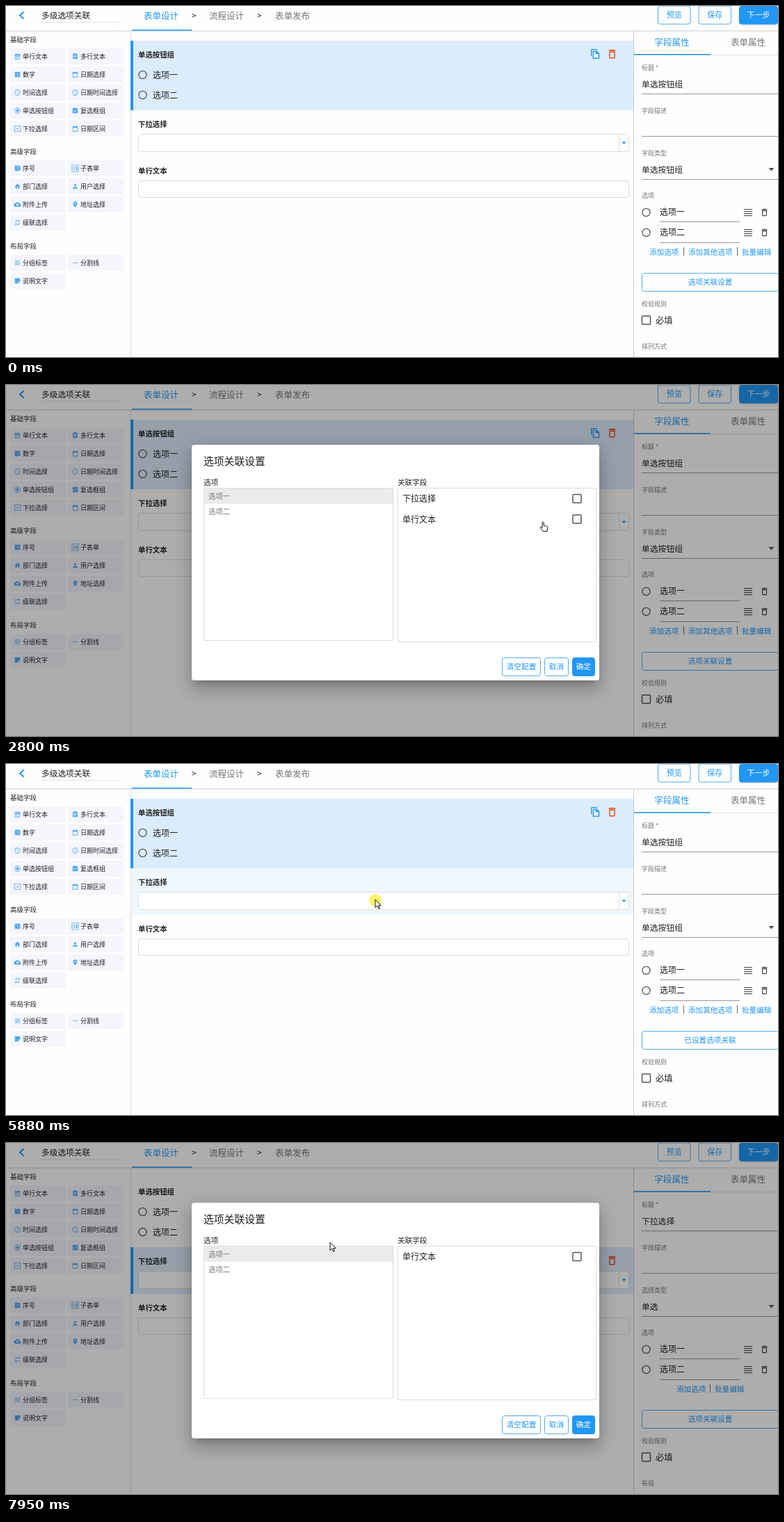
Write an HTML page with a canvas that moves like this. It is 1110 px wide and 505 px high and loops after 8 s.

```html
<!DOCTYPE html>
<html lang="zh">
<head>
<meta charset="utf-8">
<title>多级选项关联</title>
<style>
html, body { margin: 0; width: 100%; height: 100%; overflow: hidden; background: #fff; }
canvas { display: block; }
</style>
</head>
<body>
<canvas id="stage" width="1110" height="505"></canvas>
<script>
const W = 1110, H = 505, LOOP = 8000;
const BLUE = '#2196f3', EDGE = '#4fabf5', INK = '#212121', GREY = '#757575', LINE = '#dcdcdc';
const FONT = '"Noto Sans CJK SC", "Noto Sans CJK", "Noto Sans", sans-serif';
const screen = document.getElementById('stage').getContext('2d');
const layer = document.createElement('canvas');
layer.width = W;
layer.height = H;
const layerCtx = layer.getContext('2d');
let g = screen;

// Icons on a 24 unit grid, filled even-odd
const CAL = 'M3 4h3V2h2v2h8V2h2v2h3v18H3zM5 9v11h14V9z';
const icons = {
  cal: CAL,
  event: CAL + 'M7 11h10v2H7zM7 15h7v2H7z',
  doc: 'M4 3h5V1h6v2h5v18H4zM7 7h10v2H7zM7 11h10v2H7zM7 15h7v2H7z',
  one: 'M3 3h18v18H3zM14 17h-2V9h-2V7h4z',
  clock: 'M12 2a10 10 0 1 0 0 20a10 10 0 1 0 0-20zM12 4a8 8 0 1 1 0 16a8 8 0 1 1 0-16zM11 7h1.6v5l4 2.5-.8 1.3L11 13z',
  radio: 'M12 2a10 10 0 1 0 0 20a10 10 0 1 0 0-20zM12 4a8 8 0 1 1 0 16a8 8 0 1 1 0-16zM12 7a5 5 0 1 0 0 10a5 5 0 1 0 0-10z',
  check: 'M3 3h18v18H3zM10 17l9-9-1.4-1.4L10 14.2 6.4 10.6 5 12z',
  drop: 'M1 1h22v22H1zM3 3v18h18V3zM7 10h10l-5 5z',
  form: 'M0 0h24v24H0zM2 2v20h20V2zM5 6h8v2H5zM5 11h5v2H5zM5 16h8v2H5zM15 6h4v12h-4z',
  home: 'M10 20v-6h4v6h5v-8h3L12 3 2 12h3v8z',
  user: 'M12 12a4 4 0 1 0 0-8a4 4 0 1 0 0 8zM4 20v-2c0-2.7 5.3-4 8-4s8 1.3 8 4v2z',
  cloud: 'M19.4 10A7.5 7.5 0 0 0 5.4 8 6 6 0 0 0 6 20h13a5 5 0 0 0 .4-10zM14 13v4h-4v-4H7l5-5 5 5z',
  pin: 'M12 2a7 7 0 0 0-7 7c0 5.3 7 13 7 13s7-7.7 7-13a7 7 0 0 0-7-7zM12 6.5a2.5 2.5 0 1 1 0 5a2.5 2.5 0 1 1 0-5z',
  loop: 'M7 7h10v3l4-4-4-4v3H5v6h2zM17 17H7v-3l-4 4 4 4v-3h12v-6h-2z',
  lines: 'M3 5h18v2H3zM3 11h18v2H3zM3 17h18v2H3z',
  dash: 'M4 11h16v2H4z',
  note: 'M3 3h18v12l-6 6H3zM14 14v5.5l5.5-5.5z',
  trash: 'M6 7h12v12c0 1.1-.9 2-2 2H8c-1.1 0-2-.9-2-2zM8 9v10h8V9zM15.5 4l-1-1h-5l-1 1H5v2h14V4z',
  copy: 'M16 1H4c-1.1 0-2 .9-2 2v14h2V3h12zM15 5l6 6v10c0 1.1-.9 2-2 2H8c-1.1 0-2-.9-2-2V7c0-1.1.9-2 2-2zM8 7v14h11v-9h-6V7z'
};
for (const k in icons) icons[k] = new Path2D(icons[k]);
const arrow = new Path2D('M0 0v11.5l2.7-2.5 2 4.3 1.7-.8-2-4.1h3.6z');
const hand = new Path2D('M-1 1.2c0-1.6 2.1-1.6 2.1 0v4l4.6 1c1 .3 1.3 1 1.1 2l-.9 5.3H.2l-3.8-4.9c-.8-1.1.5-2 1.3-1.2l1.3 1.2z');

const sections = [
  [48, '基础字段', ['event 单行文本', 'doc 多行文本', 'one 数字', 'cal 日期选择', 'clock 时间选择',
    'clock 日期时间选择', 'radio 单选按钮组', 'check 复选框组', 'drop 下拉选择', 'cal 日期区间']],
  [209, '高级字段', ['one 序号', 'form 子表单', 'home 部门选择', 'user 用户选择', 'cloud 附件上传', 'pin 地址选择', 'loop 级联选择']],
  [345, '布局字段', ['lines 分组标签', 'dash 分割线', 'note 说明文字']]
];

// Screen updates come in bursts: start, end, count
const bursts = [
  [70, 860, 11], [940, 1090, 3], [1240, 2020, 11], [2100, 2560, 7], [2730, 3490, 11],
  [3570, 3950, 6], [4120, 4890, 11], [4950, 5720, 11], [5800, 5880, 2], [6030, 6800, 11],
  [6880, 7640, 11], [7720, 7800, 2], [7950, 7950, 1]
];
// Pointer: time, x, y
const path = [
  [70, 540, 258], [300, 560, 256], [860, 1000, 440], [1090, 1020, 399], [1240, 1018, 399],
  [1500, 990, 401], [1630, 990, 401], [2020, 420, 166], [2200, 400, 162], [2560, 772, 197],
  [3700, 772, 197], [3950, 821, 167], [4200, 821, 167], [4890, 839, 404], [5250, 839, 404],
  [5720, 531, 195], [6030, 531, 195], [6760, 957, 390], [7200, 957, 390], [7420, 652, 286],
  [7640, 459, 137], [7950, 466, 143]
];
const clicks = [[1090, 1240], [3950, 4120], [4890, 4950], [5880, 6030], [6800, 6880]];

const clamp = v => Math.max(0, Math.min(1, v));
const smooth = v => { v = clamp(v); return v * v * (3 - 2 * v); };
const inside = (p, x, y, w, h) => p.x >= x && p.x < x + w && p.y >= y && p.y < y + h;

function snap(t) {
  let shown = 0;
  for (const [a, b, n] of bursts) {
    if (t < a) break;
    const d = (b - a) / (n - 1 || 1) || 1;
    shown = Math.min(b, a + Math.floor((t - a) / d + 1e-6) * d);
  }
  return shown;
}

function pointer(t) {
  let i = 0;
  while (i < path.length - 2 && path[i + 1][0] <= t) i++;
  const [t0, x0, y0] = path[i], [t1, x1, y1] = path[i + 1];
  const k = smooth((t - t0) / (t1 - t0));
  return { x: x0 + (x1 - x0) * k, y: y0 + (y1 - y0) * k };
}

function text(s, x, cy, size, color = INK, align = 'left', weight = 400) {
  g.font = `${weight} ${size}px ${FONT}`;
  g.textAlign = align;
  g.fillStyle = color;
  g.fillText(s, x, cy + size * 0.37);
}
function fill(x, y, w, h, color) {
  g.fillStyle = color;
  g.fillRect(x, y, w, h);
}
function box(x, y, w, h, r, stroke, color, lw = 1) {
  g.beginPath();
  g.roundRect(x + 0.5, y + 0.5, w - 1, h - 1, r);
  if (color) { g.fillStyle = color; g.fill(); }
  if (stroke) { g.strokeStyle = stroke; g.lineWidth = lw; g.stroke(); }
}
function disc(x, y, r, color) {
  g.fillStyle = color;
  g.beginPath();
  g.arc(x, y, r, 0, 7);
  g.fill();
}
function poly(pts, color) {
  g.fillStyle = color;
  g.beginPath();
  pts.forEach(p => g.lineTo(...p));
  g.fill();
}
function icon(name, cx, cy, size, color) {
  g.save();
  g.translate(cx - size / 2, cy - size / 2);
  g.scale(size / 24, size / 24);
  g.fillStyle = color;
  g.fill(icons[name], 'evenodd');
  g.restore();
}
function radio(x, y) {
  g.strokeStyle = '#555';
  g.lineWidth = 1.3;
  g.beginPath();
  g.arc(x, y, 5.6, 0, 7);
  g.stroke();
}
function checkbox(x, y, on) {
  box(x - 6.5, y - 6.5, 13, 13, 1, on ? BLUE : '#555', on && BLUE, 1.5);
  if (!on) return;
  g.strokeStyle = '#fff';
  g.lineWidth = 1.6;
  g.beginPath();
  g.moveTo(x - 4, y);
  g.lineTo(x - 1.3, y + 2.8);
  g.lineTo(x + 4.2, y - 3);
  g.stroke();
}
function button(label, x, y, w, h, size, solid) {
  box(x, y, w, h, 3, solid || EDGE, solid);
  text(label, x + w / 2, y + h / 2, size, solid ? '#fff' : BLUE, 'center');
}
// A shadow alone: the casting box stays off stage
function shadow(x, y, w, h, dy, blur, spread, alpha) {
  g.save();
  g.shadowColor = `rgba(0,0,0,${alpha})`;
  g.shadowBlur = blur;
  g.shadowOffsetX = 2 * W;
  g.shadowOffsetY = dy;
  box(x - spread - 2 * W, y - spread, w + 2 * spread, h + 2 * spread, 4, null, '#000');
  g.restore();
}

function header() {
  fill(0, 0, W, 35, '#fefefe');
  [0.12, 0.06, 0.03].forEach((a, i) => fill(0, 35 + i, W, 1, `rgba(0,0,0,${a})`));
  g.strokeStyle = BLUE;
  g.lineWidth = 2;
  g.beginPath();
  g.moveTo(25.5, 8.5);
  g.lineTo(20, 13.5);
  g.lineTo(25.5, 18.5);
  g.stroke();
  text('多级选项关联', 51, 13.5, 11.7);
  for (let x = 51; x < 165; x += 2) fill(x, 23, 1, 1, '#ccc');
  text('表单设计', 198, 14, 12.5, BLUE);
  text('>', 267, 14, 12);
  text('流程设计', 292, 14, 12.5, GREY);
  text('>', 361, 14, 12);
  text('表单发布', 387, 14, 12.5, GREY);
  fill(181, 34, 86, 1.5, BLUE);
  button('预览', 937, -0.5, 47.5, 27, 11);
  button('保存', 995.5, -0.5, 47.5, 27, 11);
  shadow(1054, 0, 56, 26, 1, 3, 0, 0.3);
  button('下一步', 1054, 0, 56, 26.5, 11, BLUE);
}

function sidebar() {
  for (const [y, title, items] of sections) {
    text(title, 6, y, 9.5);
    items.forEach((item, i) => {
      const [name, label] = item.split(' ');
      const x = i % 2 ? 89 : 6, cy = y + 24.5 + 26 * (i >> 1);
      fill(x, cy - 11.5, 80, 23, '#f4f6fc');
      icon(name, x + 10.5, cy, 10, '#4fa6ee');
      text(label, x + 18, cy, 9);
    });
  }
  fill(179, 36, 1, H - 36, LINE);
}

function form(selected, hoverY) {
  const bands = [[50, 100], [150, 67], [217, 66]];
  bands.forEach(([y, h], i) => {
    if (i === selected) {
      fill(179, y, 723, h, '#dbecfc');
      fill(179, y, 4, h, BLUE);
    } else if (hoverY >= y && hoverY < y + h) fill(180, y, 722, h, '#f0f8fe');
  });
  const iconY = bands[selected][0] + 19;
  icon('copy', 847.5, iconY, 15.5, BLUE);
  icon('trash', 871.5, iconY, 17, '#e64a19');
  text('单选按钮组', 190, 70, 10.4, INK, 'left', 700);
  ['选项一', '选项二'].forEach((s, i) => {
    radio(196.5, 99 + 29 * i);
    text(s, 211, 99.5 + 29 * i, 12);
  });
  text('下拉选择', 190, 170, 10.4, INK, 'left', 700);
  box(190, 184, 706, 26, 3, LINE, '#fff');
  fill(881, 185, 1, 24, LINE);
  poly([[885.5, 195.5], [891.5, 195.5], [888.5, 199]], BLUE);
  text('单行文本', 190, 237, 10.4, INK, 'left', 700);
  box(190, 251, 706, 25, 3, LINE, '#fff');
}

function panel(t, p, select, linked, open) {
  fill(902, 36, 1, H - 36, '#ccc');
  text('字段属性', 957.5, 52, 12.5, BLUE, 'center');
  text('表单属性', 1067, 52, 12.5, GREY, 'center');
  fill(903, 70, 207, 1, '#e0e0e0');
  fill(903, 69, 110, 1.5, BLUE);
  text('标题 *', 914, 89, 9, GREY);
  text(select ? '下拉选择' : '单选按钮组', 914, 113, 11.8);
  text('字段描述', 914, 151, 9, GREY);
  text(select ? '选择类型' : '字段类型', 914, 212, 9, GREY);
  text(select ? '单选' : '单选按钮组', 914, 236, 11.8);
  poly([[1096.5, 233], [1104.5, 233], [1100.5, 237.5]], '#555');
  [126, 187, 249].forEach(y => fill(914, y, 196, 1, '#999'));
  text('选项', 914, 273, 9, GREY);
  ['选项一', '选项二'].forEach((s, i) => {
    const y = 297 + 29 * i;
    radio(920.5, y);
    text(s, 940, y, 12);
    fill(940, 310 + 30 * i, 115, 1, '#999');
    for (let k = 0; k < 4; k++) fill(1061, y - 5 + 3 * k, 12, 1.2, '#555');
    icon('trash', 1090.5, y, 14, '#444');
  });
  const links = select
    ? [[964, '添加选项'], [1019, '批量编辑']]
    : [[925, '添加选项'], [981, '添加其他选项'], [1058, '批量编辑']];
  links.forEach(([x, s], i) => {
    text(s, x, 354, 10.6, BLUE);
    if (i) fill(x - 7, 347, 1, 12, '#666');
  });

  g.save();
  g.beginPath();
  g.rect(914, 384, 196, 27);
  g.clip();
  if (!open && inside(p, 914, 384, 196, 27)) fill(914, 384, 196, 27, 'rgba(33,150,243,.05)');
  for (const [start, x] of [[1278, 990], [6892, 957]]) {
    const age = t - start;
    if (age < 0 || age > 500) continue;
    const r = (W - x) * (1 - (1 - clamp(age / 450)) ** 3);
    disc(x, 397, r, `rgba(33,150,243,${0.25 * (1 - clamp((age - 190) / 150))})`);
  }
  g.restore();
  button(linked ? '已设置选项关联' : '选项关联设置', 914, 384, 197, 27, 10.6);
  text('校验规则', 914, 429, 9, GREY);
  checkbox(920.5, 452, false);
  text('必填', 934, 452.5, 12.2);
  text(select ? '布局' : '排列方式', 914, 490, 9, GREY);
}

function dialog(t, p, fields) {
  shadow(267, 86, 586, 339, 7, 10, -4, 0.2);
  shadow(267, 86, 586, 339, 15, 24, 2, 0.14);
  shadow(267, 86, 586, 339, 6, 29, 5, 0.12);
  box(266.5, 85.5, 587, 340, 4, null, '#fff');
  text('选项关联设置', 284, 110, 14.8);
  text('选项', 284, 140.5, 10.7);
  text('关联字段', 563, 140.5, 10.6);
  box(284, 148, 273, 220, 0, '#ddd');
  box(563, 148, 286, 222, 0, '#ddd');
  fill(285, 149, 271, 22, '#ebebeb');
  text('选项一', 291, 160, 10.4, GREY);
  text('选项二', 291, 182.5, 10.4, GREY);
  fields.forEach((s, i) => {
    const y = 163.5 + 29.5 * i;
    text(s, 570, y + 0.5, 12);
    if (Math.hypot(p.x - 821, p.y - y) < 14) disc(821, y, 13.5, 'rgba(0,0,0,.06)');
    checkbox(821, y, i === 0 && t >= 4120 && t < 6000);
  });
  button('清空配置', 713, 392, 56, 27, 10.7);
  button('取消', 774, 392, 35, 27, 10.7);
  button('确定', 814, 392, 33, 27, 10.7, inside(p, 814, 392, 33, 27) ? '#64b5f6' : BLUE);
}

function cursor(t, p, open) {
  if (t < 70) return;
  if (clicks.some(([a, b]) => t >= a && t < b)) disc(p.x, p.y + 1, 9, 'rgba(255,235,0,.6)');
  const link = open
    ? inside(p, 285, 149, 271, 45) || inside(p, 565, 149, 284, 60) || inside(p, 814, 392, 33, 27)
    : inside(p, 914, 384, 196, 27);
  const shape = link && t < 7000 ? hand : arrow;
  g.save();
  g.translate(p.x, p.y);
  g.lineWidth = 1;
  g.lineJoin = 'round';
  g.fillStyle = '#fff';
  g.strokeStyle = '#111';
  g.fill(shape);
  g.stroke(shape);
  g.restore();
}

function draw(t) {
  const select = t >= 6030;
  const p = pointer(t);
  const shown = select
    ? smooth((t - 6952) / 225)
    : smooth((t - 1356) / 225) - smooth((t - 5070) / 195);
  const open = shown > 0;
  const inForm = t >= 70 && !open && p.x > 179 && p.x < 902;

  g = screen;
  fill(0, 0, W, H, '#fefefe');
  sidebar();
  form(select ? 1 : 0, inForm ? p.y : -1);
  panel(t, p, select, !select && t >= 5070, open);
  header();
  if (open) {
    fill(0, 0, W, H, `rgba(0,0,0,${0.32 * shown})`);
    g = layerCtx;
    g.clearRect(0, 0, W, H);
    dialog(t, p, select ? ['单行文本'] : ['下拉选择', '单行文本']);
    g = screen;
    g.globalAlpha = shown;
    g.drawImage(layer, 0, 0);
    g.globalAlpha = 1;
  }
  cursor(t, p, open);
}

const begin = performance.now();
function tick() {
  draw(snap((performance.now() - begin) % LOOP));
  requestAnimationFrame(tick);
}
tick();
</script>
</body>
</html>
```
